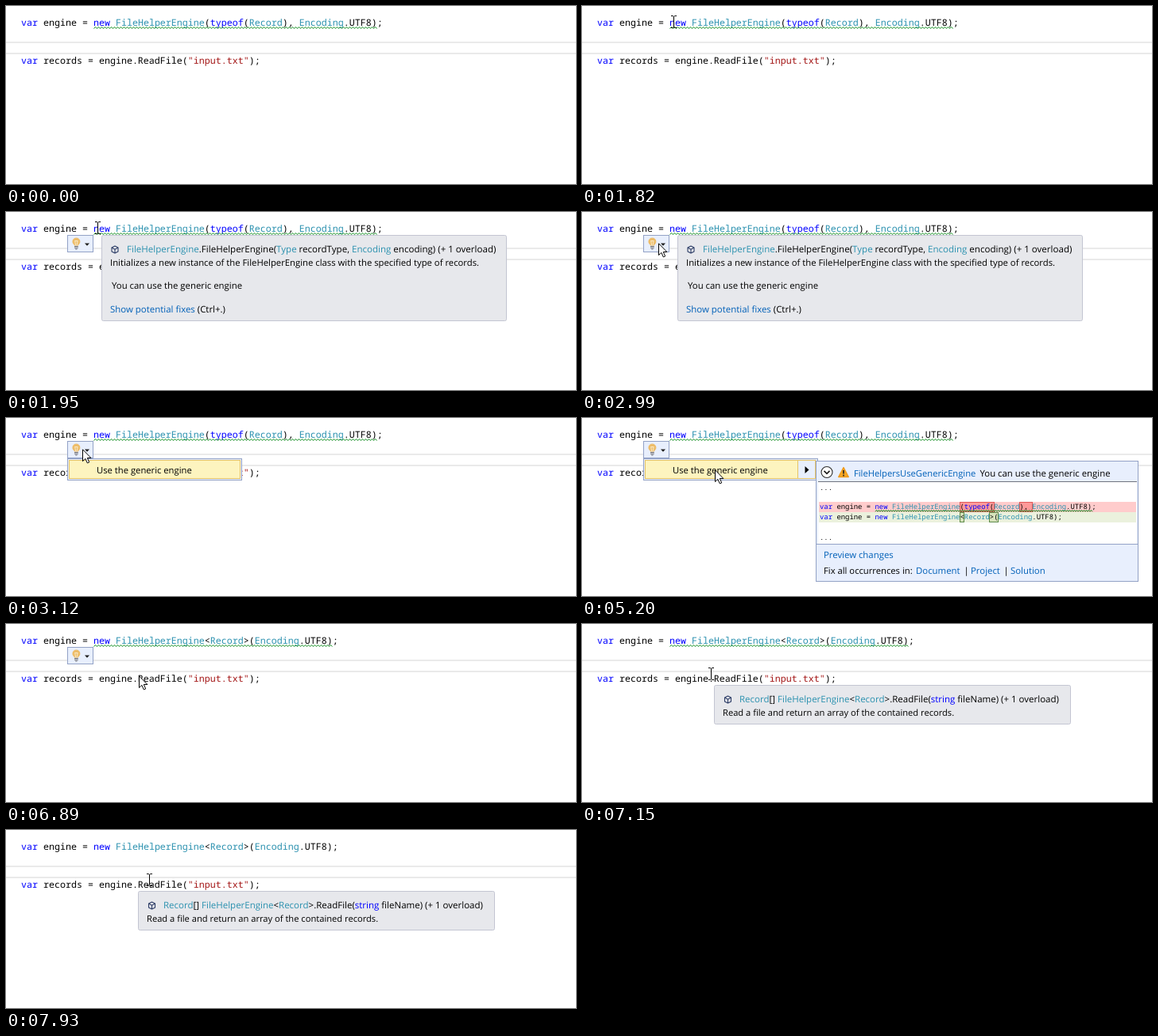
Write an HTML page that moves like this. It is 717x225 px and loops after 8 s.

```html
<!DOCTYPE html>
<html lang="en">
<head>
<meta charset="utf-8">
<title>Generic engine code fix</title>
<style>
  html, body { margin: 0; width: 100%; height: 100%; overflow: hidden; background: #fff; }
  svg { display: block; width: 100%; height: 100%; }
  text { white-space: pre; fill: #000; text-rendering: geometricPrecision; }
  .code { font-family: "Noto Sans Mono", monospace; font-size: 11.667px; }
  .small { font-size: 8.92px; }
  .ui { font-family: "Open Sans", sans-serif; font-size: 11.38px; }
  .k { fill: #0000ff; }
  .t { fill: #2b91af; }
  .s { fill: #a31515; }
  .l { fill: #0060b8; }
  .raw .t { fill: #000; }
  .wave { fill: none; stroke: #0a8a1a; stroke-width: 1; }
  .tip { fill: #e7e8ec; stroke: #c3c5d2; }
  .pop { fill: #e8effd; stroke: #93a2c6; }
  .hot { stroke: #e5c365; }
</style>
</head>
<body>
<svg id="stage" viewBox="0 0 717 225" xmlns="http://www.w3.org/2000/svg">
  <defs>
    <g id="cube" fill="none" stroke="#2c3c66" stroke-width="1.1" stroke-linejoin="round">
      <path d="M0-4.5L4-2.4V2.4L0 4.5L-4 2.4V-2.4ZM-4-2.4L0-.3L4-2.4M0-.3V4.5"/>
    </g>
  </defs>
  <path d="M0 46H717M0 60H717" stroke="#eaeaea" stroke-width="2"/>
  <g id="code"></g>
  <path id="wave" class="wave"/>

  <g id="fixTip">
    <rect class="tip" x="120.5" y="29.5" width="509" height="108" rx="2"/>
    <use href="#cube" x="137" y="47.5"/>
  </g>
  <g id="fileTip">
    <rect class="tip" x="166.5" y="77.5" width="448" height="49" rx="2"/>
    <use href="#cube" x="183.5" y="95.5"/>
  </g>

  <g id="bulb">
    <rect class="pop" x="77.5" y="29.5" width="32" height="21"/>
    <path d="M86 42.5L85.6 41.6C84.5 40.4 83.4 39.6 83.4 37.6A5 5 0 0 1 93.4 37.6C93.4 39.6 92.3 40.4 91.2 41.6L90.8 42.5Z" fill="#edbd6a"/>
    <path d="M86.8 36.5L87.6 42M90 36.5L89.2 42M86.5 36.5H90.3" fill="none" stroke="#fbeed0" stroke-width=".9"/>
    <path d="M86 43.5H90.8M86 45.3H90.8M87.2 47H89.6" stroke="#6b6b70" stroke-width="1.1"/>
    <path d="M99 39.5H105L102 42.7Z" fill="#1e1e1e"/>
  </g>

  <g id="menu">
    <rect class="pop" x="77.5" y="51.5" width="219" height="27"/>
    <rect class="hot" x="79.5" y="53.5" width="215" height="23" fill="#fdf4bf"/>
  </g>
  <g id="panel">
    <rect x="271" y="53" width="25" height="24" fill="#e8effd"/>
    <rect class="hot" x="271.5" y="53.5" width="22" height="23" fill="#e8effd"/>
    <path d="M280.5 61V70L285.5 65.5Z" fill="#000"/>
    <rect class="pop" x="294.5" y="54.5" width="405" height="152"/>
    <rect x="297" y="81" width="401" height="78" fill="#fff"/>
    <rect x="298" y="106" width="399" height="13" fill="#ffcccc"/>
    <rect x="298" y="119" width="399" height="13" fill="#ebf1dd"/>
    <g fill="#ff9999" stroke="#e05a5a">
      <rect x="475.5" y="106.5" width="43" height="12"/>
      <rect x="550.5" y="106.5" width="16" height="12"/>
    </g>
    <g fill="#d7e3bc" stroke="#5c8a4a">
      <rect x="475.5" y="119.5" width="5" height="12"/>
      <rect x="512.5" y="119.5" width="11" height="12"/>
    </g>
    <path d="M297 80.5H698" stroke="#70747e"/>
    <path d="M295 159.5H699" stroke="#93a2c6"/>
    <circle cx="308" cy="68.5" r="7" fill="#fff" stroke="#2b2b2b" stroke-width="1.1"/>
    <path d="M304.5 66.8L308 70.3L311.5 66.8" fill="none" stroke="#1e1e1e" stroke-width="1.7"/>
    <path d="M329 62.5L335.3 74.5H322.7Z" fill="#f5a623" stroke="#ee9a1c" stroke-width="1.4" stroke-linejoin="round"/>
    <path d="M329 66V70.6M329 71.8V73.4" stroke="#1e1e1e" stroke-width="1.6"/>
    <g id="before"></g>
    <g id="after"></g>
    <path id="smallWave" class="wave"/>
  </g>

  <path id="beam" d="M-3.5-7.5H-1.3L0-6.6L1.3-7.5H3.5M0-6.6V6.6M-3.5 7.5H-1.3L0 6.6L1.3 7.5H3.5" fill="none" stroke="#000"/>
  <path id="arrow" d="M.5.8V15.6L3.9 12.4L6.3 17.9L8.7 16.9L6.3 11.5H10.9Z" fill="#fff" stroke="#000"/>
</svg>
<script>
const LOOP = 8000, STEP = 130;
const $ = id => document.getElementById(id);
const TOKEN = /("[^"]*")|\b(var|new|typeof|string)\b|(?<!\.)\b(FileHelperEngine|Record|Encoding|Type)\b/g;

const escape = s => s.replace(/&/g, "&amp;").replace(/</g, "&lt;").replace(/>/g, "&gt;");
const span = (cls, s) => `<tspan class="${cls}">${s}</tspan>`;
const paint = s => escape(s).replace(TOKEN, (m, str, key) => span(str ? "s" : key ? "k" : "t", m));

function addText(parent, x, y, cls, html, size) {
  const el = document.createElementNS("http://www.w3.org/2000/svg", "text");
  el.setAttribute("x", x);
  el.setAttribute("y", y);
  el.setAttribute("class", cls);
  if (size) el.style.fontSize = size + "px";
  el.innerHTML = html;
  $(parent).appendChild(el);
  return el;
}

function zigzag(x0, x1, y, step, height) {
  let d = `M${x0} ${y + height}`;
  for (let x = x0 + step, up = true; x <= x1; x += step, up = !up) d += `L${x} ${up ? y : y + height}`;
  return d;
}

const OLD = "var engine = new FileHelperEngine(typeof(Record), Encoding.UTF8);";
const NEW = "var engine = new FileHelperEngine<Record>(Encoding.UTF8);";
const oldLine = addText("code", 19, 25, "code", paint(OLD));
const newLine = addText("code", 19, 25, "code", paint(NEW));
addText("code", 19, 73, "code", paint('var records = engine.ReadFile("input.txt");'));

const ui = (parent, x, y, html, size) => addText(parent, x, y, "ui", html, size);
ui("fixTip", 152, 51, paint("FileHelperEngine.FileHelperEngine(Type recordType, Encoding encoding) (+ 1 overload)"), 11.55);
ui("fixTip", 131, 68, "Initializes a new instance of the FileHelperEngine class with the specified type of records.", 11.3);
ui("fixTip", 133, 97, "You can use the generic engine");
ui("fixTip", 131, 127, span("l", "Show potential fixes") + " (Ctrl+.)", 11.45);
ui("fileTip", 198, 99, paint("Record[] FileHelperEngine<Record>.ReadFile(string fileName) (+ 1 overload)"), 11.5);
ui("fileTip", 177, 116, "Read a file and return an array of the contained records.", 11.16);
ui("menu", 114, 70, "Use the generic engine", 11.25);

ui("panel", 342, 74, span("l", "FileHelpersUseGenericEngine"), 11.2);
ui("panel", 500.5, 74, "You can use the generic engine");
ui("panel", 304, 177, span("l", "Preview changes"));
ui("panel", 304, 197, "Fix all occurrences in:", 11.25);
[[420, "Document"], [489, "Project"], [539, "Solution"]].forEach(([x, s]) => ui("panel", x, 197, span("l", s)));
[480.5, 530.5].forEach(x => ui("panel", x, 197, "|"));
const small = (parent, y, s) => addText(parent, 299, y, "code small", paint(s));
small("panel", 91, "...");
small("before", 115, OLD);
small("after", 128, NEW);
small("panel", 154, "...");
$("smallWave").setAttribute("d", zigzag(369, 642, 116.5, 1.5, 1.8));

const show = (el, on) => el.setAttribute("visibility", on ? "visible" : "hidden");
const mix = (a, b, p) => a + (b - a) * Math.min(1, Math.max(0, p));

// Pointer as [shape, x, y]
function pointer(t) {
  if (t < 1040) return ["", 0, 0];
  if (t < 2600) {
    const p = Math.min(1, (t - 1040) / 780), e = 1 - (1 - p) ** 2;
    return ["beam", Math.round(mix(100, 115, e)) + .5, Math.round(mix(2, 20, e))];
  }
  if (t < 4810) {
    const p = (t - 2470) / 520;
    return [t < 2730 ? "beam" : "arrow", Math.round(mix(115, 96, p)), Math.round(mix(20, 39, p))];
  }
  if (t < 7020) {
    const p = (t - 4680) / 520;
    return ["arrow", Math.round(mix(96, 167, p)), Math.round(mix(39, 65, p))];
  }
  if (t < 7150) return ["beam", 166.5, 65];
  return ["beam", t < 7930 ? 162.5 : 180.5, 63];
}

function draw(time) {
  const t = Math.floor(time / STEP) * STEP;
  const within = (a, b) => t >= a && t < b;
  const fixed = t >= 6890;

  show(oldLine, !fixed);
  show(newLine, fixed);
  $("wave").setAttribute("d", zigzag(110.5, fixed ? 411 : 467, 26.5, 2, 2));
  show($("wave"), t < 7670);

  show($("fixTip"), within(1950, 3120));
  show($("bulb"), within(1950, 7020));
  show($("menu"), within(3120, 6890));
  show($("panel"), within(3250, 6890));
  show($("smallWave"), within(4030, 6890));
  show($("fileTip"), t >= 7150);
  $("after").classList.toggle("raw", t < 3770);
  $("before").classList.toggle("raw", t < 4030);

  const [shape, x, y] = pointer(t);
  for (const id of ["beam", "arrow"]) {
    show($(id), id === shape);
    $(id).setAttribute("transform", `translate(${x} ${y})`);
  }
}

const start = performance.now();
function tick() {
  draw((performance.now() - start) % LOOP);
  requestAnimationFrame(tick);
}
draw(0);
requestAnimationFrame(tick);
</script>
</body>
</html>
```
